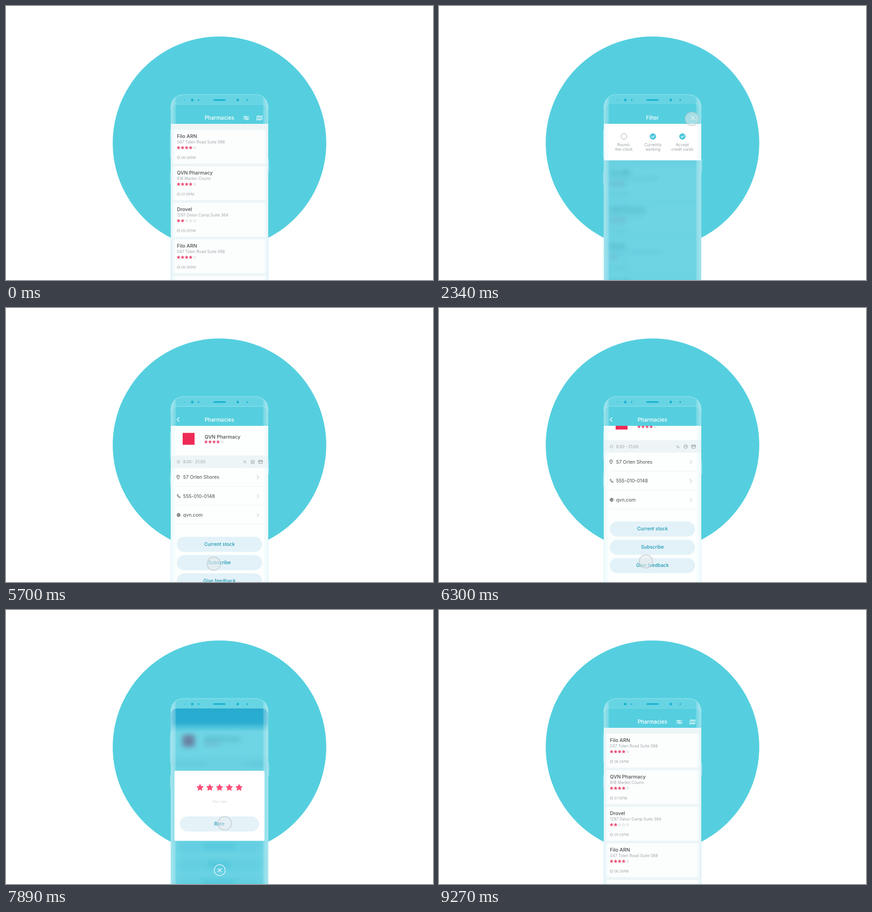
An HTML page that plays this animation: 933x600 px, repeating every 9450 ms.

```html
<!DOCTYPE html>
<html lang="en">
<head>
<meta charset="utf-8">
<title>Pharmacy finder</title>
<style>
  html, body { margin: 0; width: 100%; height: 100%; overflow: hidden; background: #fff; }
  svg { display: block; font-family: Inter, sans-serif; }
  .line { fill: none; stroke-linecap: round; stroke-linejoin: round; }
  .mid { text-anchor: middle; }
  .pin { fill: #fff; stroke: #c9dde3; stroke-width: .7; }
  .pin text { fill: #50565a; stroke: none; }
  .pin.on { fill: #fb4f78; stroke: #fb4f78; }
  .pin.on text { fill: #fff; }
  .rate { fill: #fff; stroke: #c9ced2; stroke-linejoin: round; }
  .rate.on { fill: #fb4f78; stroke: #fb4f78; }
</style>
</head>
<body>
<svg id="stage" width="933" height="600" viewBox="0 0 933 600"></svg>
<script>
const LOOP = 9450, CYAN = '#55cfdf', PINK = '#e9557a', INK = '#474b4e', GREY = '#a0a5aa', TEAL = '#1a97b0';

// Markup helpers
const text = (x, y, s, size, fill, extra = '') =>
  `<text x="${x}" y="${y}" font-size="${size}" fill="${fill}" ${extra}>${s}</text>`;
const bold = 'font-weight="500"', mid = 'class="mid"';
const rect = (x, y, w, h, fill, r = 0, extra = '') =>
  `<rect x="${x}" y="${y}" width="${w}" height="${h}" rx="${r}" fill="${fill}" ${extra}/>`;
const dot = (x, y, r, fill, extra = '') => `<circle cx="${x}" cy="${y}" r="${r}" fill="${fill}" ${extra}/>`;
const line = (d, color, w = 1, extra = '') =>
  `<path class="line" d="${d}" stroke="${color}" stroke-width="${w}" ${extra}/>`;
const group = (id, body, extra = '') => `<g id="${id}" ${extra}>${body}</g>`;
const times = (n, f) => Array.from({ length: n }, (_, i) => f(i)).join('');

const starPoints = (x, y, r) => times(10, i => {
  const a = i * Math.PI / 5, k = i % 2 ? r * .5 : r;
  return `${(x + k * Math.sin(a)).toFixed(2)},${(y - k * Math.cos(a)).toFixed(2)} `;
});
const stars = (x, y, on) => times(5, i =>
  `<polygon points="${starPoints(x + i * 8.8, y, i < on ? 3.6 : 3.2)}" stroke-linejoin="round" stroke-width=".7"
    fill="${i < on ? PINK : 'none'}" stroke="${i < on ? PINK : '#c8ccd0'}"/>`);
const clock = (x, y) => dot(x, y, 3.1, 'none', `stroke="${GREY}" stroke-width=".8"`) +
  line(`M${x + 1.3} ${y - 1.3}L${x} ${y}h-1.5`, GREY, .7);
const cross = (x, y, r) => line(`M${x - r} ${y - r}l${2 * r} ${2 * r}m0 ${-2 * r}l${-2 * r} ${2 * r}`, '#fff', 1.3);

const shops = [
  { name: 'Filo ARN', street: '047 Tolen Road Suite 068', rate: 4, time: '06:26PM' },
  { name: 'QVN Pharmacy', street: '618 Marlen Courts', rate: 4, time: '01:15PM' },
  { name: 'Drovel', street: '1297 Delun Camp Suite 364', rate: 2, time: '05:05PM' }
];

const listCard = i => {
  const s = shops[i % 3], y = 271 + i * 80;
  return rect(364.5, y, 204, 74, '#fcfefe', 2) + text(373.5, y + 18, s.name, 10.75, INK, bold) +
    text(373.5, y + 30.3, s.street, 8.6, GREY) + stars(377, y + 39.3, s.rate) +
    clock(376.8, y + 61) + text(382.7, y + 63.7, s.time, 7.4, GREY);
};
const list = rect(340, 190, 253, 520, '#eef5f7') + times(5, listCard);

// Map: seeded street patches, main roads, water, pins
let seed = 7;
const rnd = () => (seed = seed * 16807 % 2147483647) / 2147483647;
const streets = times(65, () => {
  const n = 4 + rnd() * 4 | 0, w = 20 + rnd() * 30, gap = 4 + rnd() * 4;
  const rows = times(n, i => `M${-w / 2} ${(i - n / 2) * gap}h${w}`);
  const cols = times(4, i => `M${(i - 1.5) * w / 4} ${-n * gap / 2}v${n * gap}`);
  return line(rows + cols, '#c3e9f2', .5,
    `transform="translate(${360 + rnd() * 213} ${216 + rnd() * 384}) rotate(${-60 + rnd() * 50})"`);
});
const roads = ['M360 372C400 345 470 385 573 322', 'M376 524L470 395L520 300L573 240', 'M360 276C400 300 425 350 430 440',
  'M360 428C400 440 470 470 573 510', 'M440 258C470 320 520 330 573 345', 'M474 470C480 430 520 390 573 350',
  'M360 338C380 380 410 440 470 522', 'M540 600C560 540 530 480 573 440'];
const water = ['M512 216C525 240 512 270 490 288C500 310 514 318 512 345L500 400C492 430 486 440 470 446L436 464C424 478 420 500 424 540L414 540C410 510 414 480 422 466C428 440 444 428 462 424C480 405 492 390 496 370C504 340 496 318 484 296C492 270 516 250 504 216Z',
  'M573 372L552 380L556 398L528 388L552 408L522 402L554 420L534 424L556 438L470 440L450 452L560 446L566 490L548 522L573 522Z',
  'M500 600L530 592L552 600Z', 'M510 280L540 262L552 282L520 304Z'];
const pins = [[530.5, 331, '3,1'], [515, 346.5, '3,1'], [468.3, 405.5, '2,2'], [403.5, 452.5, '5,1']];
const pin = ([x, y, km]) => `<g class="pin" transform="translate(${x} ${y})">
  <path d="M1.5 22Q0 24 -1.5 22C-5 16 -15 9 -15 0A15 15 0 0 1 15 0C15 9 5 16 1.5 22Z"/>
  ${text(0, 0, km, 8.8, '', mid)}${text(0, 9, 'KM', 6, '', mid + ' font-weight="600"')}</g>`;
const mapCard = (s, km, time) => rect(364.5, 522, 204, 73.5, '#fff', 2) +
  text(373.5, 539.6, s.name, 10.75, INK, bold) +
  text(559, 539.6, km, 10.75, INK, 'font-weight="600" text-anchor="end"') +
  text(373.5, 552, s.street, 8.6, GREY) + clock(376.8, 582.5) + text(382.7, 585.2, time, 7.4, GREY);
const map = rect(340, 190, 253, 430, '#daf3f8') + streets +
  dot(449, 382, 21, '#d2eff6', 'stroke="#bde7f1" stroke-width="1.5"') +
  roads.map((d, i) => line(d, '#b9e6f1', i % 2 ? 1.3 : 2)).join('') +
  water.map(d => `<path d="${d}" fill="#fcfefe"/>`).join('') +
  line(roads[0], '#b9e6f1', 1.2) + pins.map(pin).join('') +
  group('cardA', mapCard(shops[2], '2.2km', '09:00AM')) + group('cardB', mapCard(shops[1], '3.1km', '01:15PM'));

// Pharmacy page
const rowIcons = [
  line('M376 374.5Q372.8 371 372.8 369A3.2 3.2 0 0 1 379.2 369Q379.2 371 376 374.5Z', INK, 1) + dot(376, 369, 1, INK),
  line('M374.3 408.3Q373 410 375.5 413T380.5 415.3L380.8 413.6L379 412.6L378 413.4Q376.4 412.4 375.8 411L376.4 410L375.6 408.2Z', INK, .9),
  dot(377.2, 453.3, 3.5, 'none', `stroke="${INK}" stroke-width="1"`) +
    line('M373.7 453.3h7M377.2 449.8v7M377.2 449.8q-3.4 3.5 0 7q3.4 -3.5 0 -7', INK, .7)
];
const row = (s, i) => {
  const y = 370.5 + i * 41.4;
  return rowIcons[i] + text(387, y + 3.8, s, 10.4, INK) + line(`M548.3 ${y - 4}l4 4l-4 4`, '#c6cbce', 1.1) +
    rect(373, y + 19.7, 188, .8, '#e6eef0');
};
const button = (s, i) => rect(373, 501 + i * 40, 186.5, 33, '#e3f2f8', 16.5) + text(466.5, 520.8 + i * 40, s, 10.3, TEAL, mid + ' ' + bold);
const page = rect(386, 273.5, 26, 26, '#ee2b55') +
  text(434, 285.8, shops[1].name, 10.75, INK, bold) + stars(437, 293.3, 4) +
  rect(340, 323, 253, 27, '#edf5f7') + clock(376.8, 337) + text(387, 340, '9.00 - 21.00', 8.5, '#979fa4') +
  text(522, 340, '%', 8, '#7f898e', mid) +
  dot(539, 337, 4, 'none', 'stroke="#7f898e" stroke-width=".8"') + text(539, 338.7, '24', 4.5, '#7f898e', mid) +
  rect(552, 333.3, 8.3, 7, 'none', 1, 'stroke="#7f898e" stroke-width=".9"') + rect(552, 335, 8.3, 1.3, '#7f898e') +
  ['57 Orlen Shores', '555-010-0148', 'qvn.com'].map(row).join('') +
  ['Current stock', 'Subscribe', 'Give feedback'].map(button).join('');

// Filter panel
const option = (a, b, i) => {
  const x = [404, 467.5, 531.8][i];
  return dot(x, 285.7, 6.2, '#fff', 'stroke="#9da3a7" stroke-width="1"') +
    group('check' + i, dot(x, 285.7, 6.8, '#4cc8de') + line(`M${x - 3} 285.8l2.2 2.2l4 -4`, '#fff', 1.3)) +
    text(x, 307.2, a, 8.6, '#9a9fa3', mid) + text(x, 316.6, b, 8.6, '#9a9fa3', mid);
};
const panel = rect(360, 258, 213, 80, '#fff') + option('Round-', 'the-clock', 0) +
  option('Currently', 'working', 1) + option('Accept', 'credit cards', 2);

const sliders = line('M519 242.8h2.4m4 0h5.6M519 247.4h5.6m4 0h2.4', '#fff', 1.3) +
  dot(523.3, 242.8, 1.8, 'none', 'stroke="#fff" stroke-width="1.2"') + dot(526.6, 247.4, 1.8, 'none', 'stroke="#fff" stroke-width="1.2"');
const header =
  group('title', text(466.3, 248.5, 'Pharmacies', 11.5, '#fff', mid + ' ' + bold)) +
  group('sliders', sliders) +
  group('mapIcon', line('M548.3 242l3.6 -1.8l3.6 1.8l3.8 -1.8v8l-3.8 1.8l-3.6 -1.8l-3.6 1.8zM551.9 240.2v8M555.5 242v8', '#fff', 1.2)) +
  group('listIcon', times(3, i => line(`M548.6 ${241.6 + i * 3.6}h.3m3 0h8`, '#fff', 1.3))) +
  group('filterHead', text(466.3, 248.5, 'Filter', 11.5, '#fff', mid + ' ' + bold) + cross(555, 244.8, 4.2)) +
  group('back', line('M378 240l-4 4.2l4 4.2', '#fff', 1.4));

const dialog = rect(368, 352, 197, 153.5, '#fff', 3.5) +
  times(5, i => `<polygon class="rate" points="${starPoints(424 + i * 21.3, 389, 7.6)}"/>`) +
  text(466.5, 421.5, 'Your rate', 7.3, '#cfd1d3', mid) +
  rect(380, 452, 173, 33, '#e5f2f8', 16.5) + text(466.3, 472.2, 'Rate', 10.6, '#1795b5', mid + ' ' + bold) +
  dot(467, 569.7, 12, 'none', 'stroke="#fff" stroke-width="1.2"') + cross(467, 569.7, 3.8);

const sensors = [[391, .9], [407, 2.7], [421, 1.8], [506.5, 2.7], [527, 1.8]];
const stop = (o, c, a) => `<stop offset="${o}" stop-color="${c}" stop-opacity="${a}"/>`;
const edge = 'fill="url(#edge)"';

stage.innerHTML = `<defs>
    <clipPath id="screen"><path d="M360 600V230Q361 216 375 215.5H558Q572 216 573 230V600Z"/></clipPath>
    <linearGradient id="edge">${stop(0, '#d4f1f7', .55)}${stop(.4, '#e6f7fb', .36)}${stop(.8, '#e6f7fb', .26)}${stop(1, '#fff', 0)}</linearGradient>
    <linearGradient id="dark" x2="0" y2="1">${stop(0, '#27abcf', 1)}${stop(.6, '#2aadd0', 1)}${stop(1, '#2aadd0', 0)}</linearGradient>
  </defs>` +
  dot(466.5, 300, 233.3, CYAN) +
  rect(358.4, 271, 3, 62, '#8fdfea') + rect(358.4, 362, 3, 29, '#8fdfea') + rect(571.8, 335, 3, 29, '#8fdfea') +
  rect(360.5, 194, 212, 450, '#67d4e3', 27, 'stroke="#8adfea" stroke-width="1.3"') +
  sensors.map(([x, r]) => dot(x, 206, r, '#16b0cf')).join('') + rect(453, 204.2, 27, 3.3, '#16b0cf', 1.6) +
  `<g clip-path="url(#screen)">` +
  group('content', group('list', list) + group('map', map) +
    group('detail', rect(340, 190, 253, 430, '#fcfffe') + group('page', page))) +
  group('tint', rect(360, 210, 213, 390, '#11b9d4')) + group('panel', panel) +
  group('bar', rect(360, 215, 213, 43, CYAN)) + group('header', header) +
  group('dark', rect(360, 215, 213, 52, 'url(#dark)')) + group('dialog', dialog) + '</g>' +
  `<path d="M360 600V222Q361 205 372 198V600Z" ${edge}/>` +
  `<path d="M360 600V222Q361 205 372 198V600Z" ${edge} transform="matrix(-1 0 0 1 933 0)"/>` +
  group('cursor', dot(0, 0, 15.3, '#e6eaec', 'id="touch" stroke="#b4bdc1" stroke-opacity=".75" stroke-width="1.5"'));

const el = id => document.getElementById(id);
const clamp = v => Math.max(0, Math.min(1, v));
const easeOut = u => 1 - (1 - u) ** 3;
const ramp = (t, a, b) => { const u = clamp((t - a) / (b - a)); return u * u * (3 - 2 * u); };
const show = (id, k) => { el(id).style.opacity = k; el(id).style.display = k > 0 ? '' : 'none'; };
const move = (id, y) => el(id).setAttribute('transform', `translate(0 ${y})`);

// Pointer moves: start, end, x, y
const moves = [[0, 30, 407, 294], [30, 440, 525, 245], [1000, 1360, 467, 286], [1580, 1820, 532, 286], [1980, 2320, 552.5, 247],
  [3810, 4420, 515, 350], [4480, 4740, 454, 560], [5730, 5960, 454, 526], [6000, 6290, 452, 555],
  [6760, 7020, 424, 390], [7060, 7500, 509, 390], [7560, 7860, 478, 467], [8120, 8460, 376, 247]];
const taps = [470, 1440, 1880, 2400, 3170, 4430, 4780, 5740, 6350, 7960, 8500];

function pointer(t) {
  let [x, y] = moves[0].slice(2);
  for (const [a, b, tx, ty] of moves) {
    const k = easeOut(clamp((t - a) / (b - a)));
    x += (tx - x) * k;
    y += (ty - y) * k;
  }
  return [x, y];
}

function draw(t) {
  const filter = ramp(t, 670, 1020) - ramp(t, 2400, 2640);
  const mapOn = t < 6000 ? ramp(t, 3150, 3600) : 0;
  const detail = ramp(t, 4810, 5250) - ramp(t, 8640, 9180);
  const modal = ramp(t, 6390, 6760) - ramp(t, 8000, 8360);
  const haze = Math.max(filter, modal), swap = ramp(t, 4430, 4520);

  el('content').style.filter = haze ? `blur(${6 * haze}px)` : 'none';
  show('tint', .6 * haze);
  move('list', 80 * filter);
  show('map', mapOn);
  show('detail', detail);
  move('page', -33.4 * (ramp(t, 5730, 5960) - ramp(t, 6390, 6760)));
  show('cardA', 1 - swap);
  show('cardB', swap);
  document.querySelectorAll('.pin').forEach((p, i) => p.classList.toggle('on', i === (t < 4430 ? 2 : 1)));

  show('panel', filter > 0 ? 1 : 0);
  move('panel', 80 * (filter - 1));
  show('check0', 0);
  show('check1', ramp(t, 1440, 1540));
  show('check2', ramp(t, 1880, 1980));

  show('bar', (1 - .1 * mapOn * (1 - detail)) * (1 - modal));
  show('header', 1 - modal);
  show('title', 1 - filter);
  show('filterHead', filter);
  show('sliders', (1 - filter) * (1 - detail));
  show('mapIcon', (1 - filter) * (1 - mapOn) * (1 - detail));
  show('listIcon', mapOn * (1 - detail));
  show('back', detail);

  show('dark', modal);
  show('dialog', modal);
  move('dialog', 40 * (1 - modal));
  document.querySelectorAll('.rate').forEach((s, i) => s.classList.toggle('on', t > 7040 + i * 75));

  const [x, y] = pointer(t), tap = Math.max(...taps.map(p => clamp(1 - Math.abs(t - p) / 110)));
  show('cursor', ramp(t, 0, 110) - ramp(t, 8530, 8605));
  el('cursor').setAttribute('transform', `translate(${x} ${y}) scale(${1 - .08 * tap})`);
  el('touch').setAttribute('fill-opacity', .42 + .25 * tap);
}

function tick() {
  draw(performance.now() % LOOP);
  requestAnimationFrame(tick);
}
tick();
</script>
</body>
</html>
```
